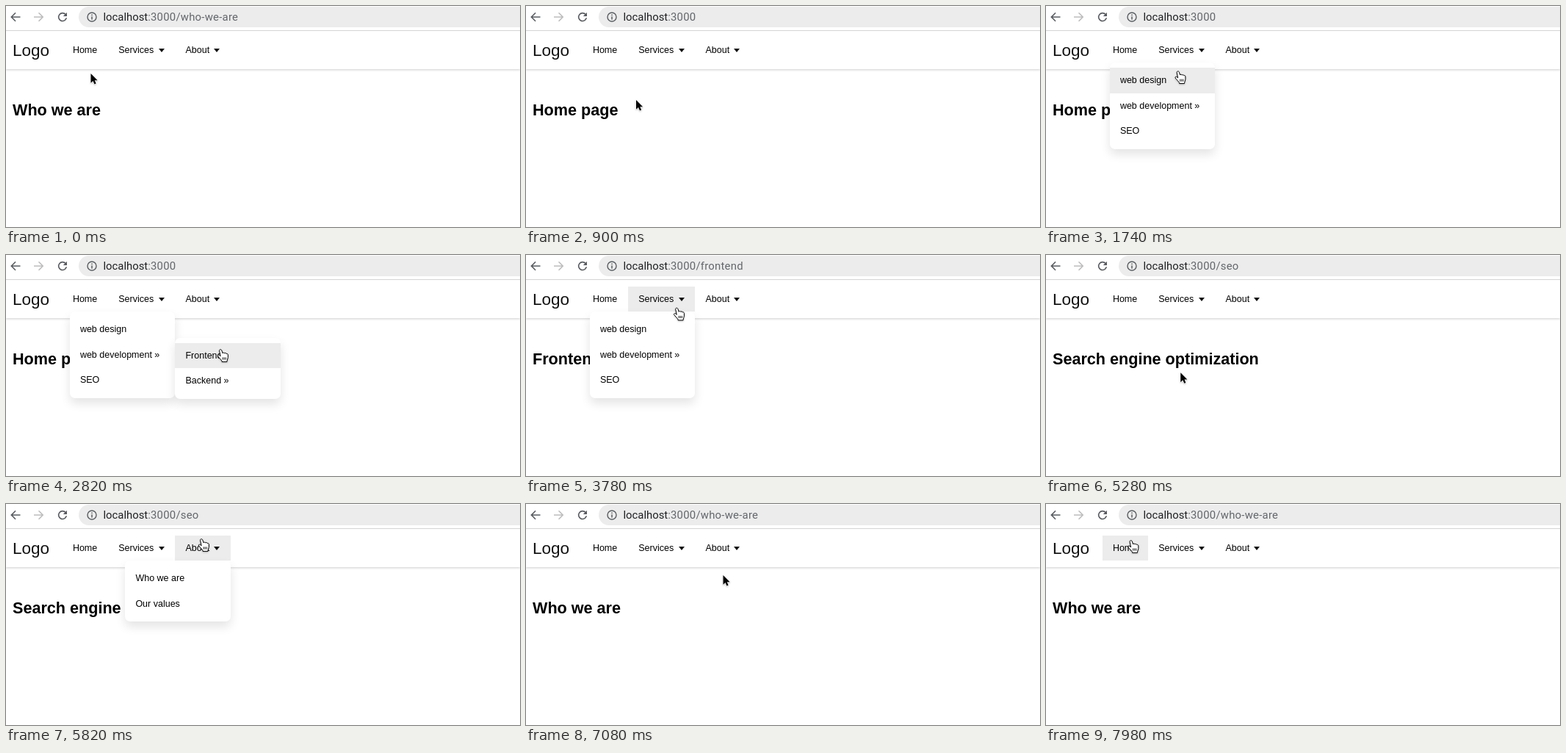
An HTML page that plays this animation: 700 by 301 pixels, repeating every 8000 ms.

```html
<!DOCTYPE html>
<html lang="en">
<head>
<meta charset="utf-8">
<title>Dropdown navigation</title>
<style>
  html, body { margin: 0; width: 100%; height: 100%; overflow: hidden; background: #fff; }
  body { position: relative; font: 12.5px "Liberation Sans", Arial, sans-serif; color: #000; }
  body * { box-sizing: border-box; }
  .abs, .link, .menu, #cursor { position: absolute; white-space: pre; }
  #bar { left: 0; top: 0; width: 100%; height: 34px; border-bottom: 1px solid #dcdcdc; }
  #pill { left: 99px; top: 1px; width: 640px; height: 28px; border-radius: 14px; background: #ececec; }
  #icons { left: 0; top: 0; }
  #url { left: 132.5px; top: 0; font: 14.85px/30px Roboto, sans-serif; color: #202124; }
  #path { color: #63676b; letter-spacing: .25px; }
  #nav { left: 0; top: 34px; width: 100%; height: 51.5px; background: #fff; box-shadow: 0 1px 3px rgba(0,0,0,.2); }
  #logo { left: 9px; top: 47.5px; font-size: 22.5px; line-height: 25px; color: #111; }
  #title { left: 9px; top: 129px; font-size: 21.6px; line-height: 25px; font-weight: bold; }
  .link { padding-left: 14.4px; }
  .link.on { background: #ececec; }
  .caret::after {
    content: ""; position: absolute; right: 14.2px; top: 15px;
    border: 4px solid transparent; border-top: 5px solid #111; border-bottom: 0;
  }
  .menu { display: none; background: #fff; border-radius: 7px; box-shadow: 0 7px 14px rgba(0,0,0,.11); }
  .menu.open { display: block; }
  #cursor { left: 0; top: 0; overflow: visible; width: 1px; height: 1px; filter: drop-shadow(0 1px 1px rgba(0,0,0,.25)); }
</style>
</head>
<body>
  <div id="bar" class="abs"></div>
  <div id="pill" class="abs"></div>
  <svg id="icons" class="abs" width="130" height="32" fill="none" stroke="#5a5d61" stroke-width="1.6">
    <path d="M19.5 15H7.5M13 9.3L7.3 15L13 20.7"/>
    <path stroke="#bdbdbd" d="M38 15H50M44.5 9.3L50.2 15L44.5 20.7"/>
    <path d="M81.2 11.6A5.4 5.4 0 1 0 82.3 16.2"/>
    <path d="M83 8.8V14H77.8Z" fill="#5a5d61" stroke="none"/>
    <circle cx="117" cy="15" r="6" stroke-width="1.4"/>
    <path stroke-width="1.5" d="M117 14.2V18.4M117 11.4V12.9"/>
  </svg>
  <div id="url" class="abs">localhost<span id="path"></span></div>
  <div id="title" class="abs"></div>
  <div id="nav" class="abs"></div>
  <div id="logo" class="abs">Logo</div>
  <svg id="cursor">
    <path id="arrow" d="M0 0V12.8L3 10L5 14.5L7.1 13.6L5.2 9.2H9.1Z" stroke="#fff" style="paint-order:stroke"/>
    <g id="hand" fill="#fff" stroke="#000" stroke-linejoin="round">
      <path d="M-2.4 1.4C-2.6-.6.2-.9.8 1L2 4.8C2.6 3.6 4.4 3.8 4.7 5C5.4 4 7 4.4 7.2 5.6C8 5 9.2 5.6 9.3 6.8V10.5C9.3 12.5 8 13.6 8 15.4V16.4H1V15.4C0 13.4-3 11-4.4 8.8C-5.2 7.4-3.4 6.4-2.2 7.6L-.9 8.8Z"/>
      <path stroke-width=".9" d="M2.2 10.4V13.6M4.2 10.4V13.6M6.2 10.4V13.6"/>
    </g>
  </svg>
<script>
  const LOOP = 8000, STEP = 60;
  const ROW = 34.5, PAD = 7.2, MENU_W = 143.6;
  const $ = id => document.getElementById(id);
  const cursor = $('cursor');

  const pages = {
    who: ['/who-we-are', 'Who we are'],
    home: ['', 'Home page'],
    frontend: ['/frontend', 'Frontend'],
    seo: ['/seo', 'Search engine optimization']
  };
  const clicks = { 360: 'home', 3180: 'frontend', 4860: 'seo', 7080: 'who' };

  // Each link knows which menus stay open while it is hovered
  const links = [], boxes = {};
  function addLink(parent, cls, label, x, y, w, h, menu, opens) {
    const el = document.createElement('div');
    el.className = 'link ' + cls;
    el.textContent = label;
    el.style.cssText = `position:absolute;left:${x - parent.x}px;top:${y - parent.y}px;` +
      `width:${w}px;height:${h}px;line-height:${h}px`;
    parent.el.append(el);
    links.push({ el, x, y, w, h, menu, opens });
  }

  function addMenu(name, x, y, rows, chain, child) {
    const el = boxes[name] = document.createElement('div');
    el.className = 'menu';
    el.style.cssText = `left:${x}px;top:${y}px;width:${MENU_W}px;height:${rows.length * ROW + 2 * PAD}px`;
    document.body.append(el);
    rows.forEach((label, i) => {
      const opens = child && label.endsWith('»') ? [...chain, child] : chain;
      addLink({ el, x, y }, '', label, x, y + PAD + i * ROW, MENU_W, ROW, name, opens);
    });
  }

  const root = { el: document.body, x: 0, y: 0 };
  const edges = {};
  let right = 76.5;
  for (const [label, width] of [['Home', 62.4], ['Services', 91.2], ['About', 75.5]]) {
    const drops = label !== 'Home';
    addLink(root, drops ? 'caret' : '', label, right, 43, width, 34, null, drops ? [label] : []);
    edges[label] = right += width;
  }
  addMenu('Services', edges.Services - MENU_W, 77, ['web design', 'web development »', 'SEO'], ['Services'], 'sub');
  addMenu('sub', edges.Services, 77 + ROW + 1, ['Frontend', 'Backend »'], ['Services', 'sub']);
  addMenu('About', edges.About - MENU_W, 77, ['Who we are', 'Our values'], ['About']);
  document.body.append(cursor);

  // Pointer moves: begin, end, x, y, downward bend
  const moves = [
    [0, 120, 116.5, 50],
    [360, 900, 150, 128],
    [1260, 1500, 176, 60],
    [1500, 2040, 187, 130],
    [2280, 2820, 293, 129, 15],
    [3600, 3840, 190, 62],
    [3840, 4380, 182.5, 172],
    [5220, 5520, 190, 60],
    [5520, 5820, 267, 48],
    [5820, 6300, 268.5, 97],
    [7380, 7860, 115.5, 92, 50],
    [7860, 7980, 116.5, 50]
  ];

  function pointer(t) {
    let x = 115.5, y = 92;
    for (const [begin, end, toX, toY, bend = 0] of moves) {
      if (t <= begin) break;
      const s = Math.min(1, (t - begin) / (end - begin));
      const ease = s * s * (3 - 2 * s);
      x += (toX - x) * ease;
      y += (toY - y) * ease + bend * Math.sin(Math.PI * s);
    }
    return [x, y];
  }

  const hit = (x, y, open) => links.find(l => (!l.menu || open.includes(l.menu)) &&
    x >= l.x && x < l.x + l.w && y >= l.y && y < l.y + l.h);

  // Walk the loop once, so that each step has its menu state
  const states = [];
  let page = 'who', open = [];
  for (let t = 0; t < LOOP; t += STEP) {
    const [x, y] = pointer(t);
    if (clicks[t]) { page = clicks[t]; open = []; }
    const over = hit(x, y, open);
    if (over) open = over.opens;
    states.push({ x, y, page, open, over });
  }

  function draw(s) {
    const [path, title] = pages[s.page];
    $('path').textContent = ':3000' + path;
    $('title').textContent = title;
    for (const name in boxes) boxes[name].classList.toggle('open', s.open.includes(name));
    for (const l of links) l.el.classList.toggle('on', l === s.over);
    $('hand').style.display = s.over ? '' : 'none';
    $('arrow').style.display = s.over ? 'none' : '';
    cursor.style.transform = `translate(${s.x}px,${s.y}px)`;
  }

  const start = performance.now();
  let shown = null;
  function tick() {
    const t = (performance.now() - start) % LOOP;
    const s = states[Math.floor(t / STEP)];
    if (s !== shown) draw(shown = s);
    requestAnimationFrame(tick);
  }
  tick();
</script>
</body>
</html>
```
